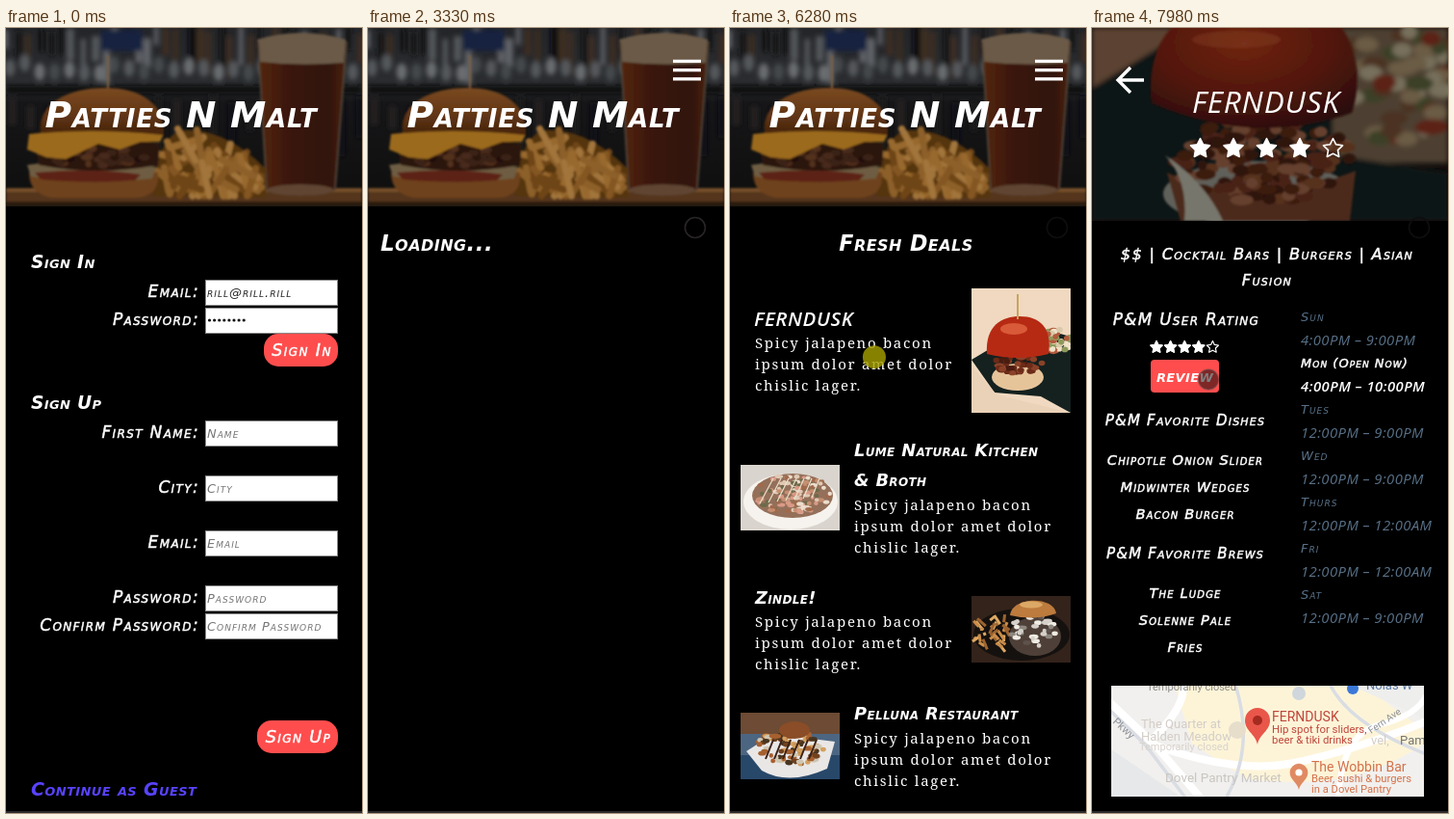
Write an HTML page that moves like this. It is 370 px wide and 814 px high and loops after 8000 ms.

```html
<!DOCTYPE html>
<html lang="en">
<head>
<meta charset="utf-8">
<title>Patties N Malt</title>
<style>
  html, body { margin: 0; width: 100%; height: 100%; overflow: hidden; background: #000; }
  svg { display: block; }
  .hand, .thin, .bold { font-family: "DejaVu Sans", sans-serif; font-style: italic; font-variant: small-caps; letter-spacing: .08em; }
  .hand { stroke-width: .5px; }
  .bold { font-weight: 700; letter-spacing: .02em; }
  .tall { font-family: "Open Sans", sans-serif; font-style: italic; letter-spacing: .03em; }
  .slab { font-family: "Noto Serif", serif; font-size: 15px; letter-spacing: 1.7px; }
  .plain { font-family: Roboto, sans-serif; }
  .status { font-family: "Open Sans", sans-serif; }
</style>
</head>
<body>
<svg id="stage" width="100%" height="100%" viewBox="0 0 370 814"></svg>
<script>
const stage = document.getElementById('stage');
const LOOP = 8000, RED = '#ff4d4d', SLATE = '#587188';

let seed = 11;
const rnd = (a, b) => {
  seed = (seed * 16807) % 2147483647;
  return a + (b - a) * seed / 2147483647;
};
const pick = list => list[Math.floor(rnd(0, list.length))];
const many = (n, make) => Array.from({ length: n }, (_, i) => make(i)).join('');
const esc = s => s.replace(/&/g, '&amp;');

const text = (s, x, y, size, { fill = '#fff', anchor = 'start', cls = 'hand', weight = '', extra = '' } = {}) =>
  `<text class="${cls}" x="${x}" y="${y}" fill="${fill}" ${cls === 'hand' ? `stroke="${fill}"` : ''} text-anchor="${anchor}" style="font-size:${size}px;${weight && 'font-weight:' + weight}" ${extra}>${esc(s)}</text>`;
const mid = (s, x, y, size, o = {}) => text(s, x, y, size, { anchor: 'middle', ...o });
const BOLD = { cls: 'bold' };
const rect = (x, y, w, h, fill, rx = 0, extra = '') =>
  `<rect x="${x}" y="${y}" width="${w}" height="${h}" rx="${rx}" fill="${fill}" ${extra}/>`;
const oval = (cx, cy, rx, ry, fill, extra = '') =>
  `<ellipse cx="${cx}" cy="${cy}" rx="${rx}" ry="${ry}" fill="${fill}" ${extra}/>`;
const path = (d, fill, extra = '') => `<path d="${d}" fill="${fill}" ${extra}/>`;
const line = (d, color, w, extra = '') => path(d, 'none', `stroke="${color}" stroke-width="${w}" ${extra}`);
const group = (id, body) => `<g id="${id}">${body}</g>`;
const frame = (x, y, w, h, body) => `<svg x="${x}" y="${y}" width="${w}" height="${h}" viewBox="0 0 ${w} ${h}">${body}</svg>`;
const blur = (body, k = 'soft') => `<g filter="url(#${k})">${body}</g>`;

function star(cx, cy, r, full) {
  const pts = many(10, i => {
    const a = i * Math.PI / 5 - Math.PI / 2, k = i % 2 ? r * .5 : r;
    return `${(cx + k * Math.cos(a)).toFixed(1)},${(cy + k * Math.sin(a)).toFixed(1)} `;
  });
  return `<polygon points="${pts}" fill="${full ? '#fff' : 'none'}" stroke="#fff" stroke-width="${r > 9 ? 1.6 : 1.2}" stroke-linejoin="round"/>`;
}

const scatter = (n, cx, cy, rx, ry, colors, size) => many(n, () => {
  const a = rnd(0, 6.28), k = Math.sqrt(rnd(0, 1));
  return oval(cx + rx * k * Math.cos(a), cy + ry * k * Math.sin(a), rnd(size * .6, size * 1.5), size * .7, pick(colors));
});

const defs = `<defs>
  <filter id="soft" x="-20%" y="-20%" width="140%" height="140%"><feGaussianBlur stdDeviation="2.4"/></filter>
  <filter id="slight"><feGaussianBlur stdDeviation=".8"/></filter>
  <linearGradient id="bun" x1="0" y1="0" x2="0" y2="1"><stop offset="0" stop-color="#7a4a22"/><stop offset=".55" stop-color="#643715"/><stop offset="1" stop-color="#43220d"/></linearGradient>
  <linearGradient id="beer" x1="0" y1="0" x2="1" y2="0"><stop offset="0" stop-color="#55270d"/><stop offset=".35" stop-color="#3a1607"/><stop offset=".8" stop-color="#30120a"/><stop offset="1" stop-color="#4e2510"/></linearGradient>
  <linearGradient id="bar" x1="0" y1="0" x2="0" y2="1"><stop offset="0" stop-color="#242528"/><stop offset=".3" stop-color="#2a2c2f"/><stop offset=".42" stop-color="#161618"/><stop offset="1" stop-color="#0e0e0e"/></linearGradient>
  <radialGradient id="dome" cx=".45" cy=".3" r=".75"><stop offset="0" stop-color="#6f2410"/><stop offset=".6" stop-color="#50160a"/><stop offset="1" stop-color="#2a0d08"/></radialGradient>
</defs>`;

const banner = frame(0, 0, 370, 185,
  rect(0, 0, 370, 185, 'url(#bar)') +
  blur(many(34, i => rect(i * 11 + rnd(-3, 3), rnd(-6, 12), rnd(4, 8), rnd(18, 46), pick(['#55585c', '#131415', '#3f2e20', '#0e0f10', '#62656a']))) +
    many(24, i => oval(i * 15.5 + 4, rnd(36, 48), 5.5, 9, pick(['#6a6d70', '#44484c', '#55585c']))) +
    rect(98, 2, 44, 22, '#162440') + rect(0, 60, 370, 8, '#09090a') +
    many(20, i => rect(i * 19 + 3, rnd(70, 84), 7, rnd(20, 60), pick(['#1d1d1f', '#101012', '#262422'])))) +
  blur(
    rect(0, 166, 370, 19, '#54351a') + rect(0, 166, 370, 4, '#76502a') + rect(0, 180, 370, 5, '#2c1a0c') +
    path('M262 16 L354 16 L342 168 Q304 178 270 168 Z', 'url(#beer)') +
    path('M261 12 Q306 -2 353 12 L351 36 Q306 40 263 35 Z', '#6b5a47') +
    line('M262 14 L271 168 M354 14 L342 168', '#4e4034', 2) +
    oval(306, 168, 35, 6, '#5e4433') +
    path('M152 174 Q158 108 186 106 Q228 104 270 146 L270 176 Z', '#55340f') +
    many(58, () => {
      const x = rnd(164, 256), top = 116 + Math.abs(x - 192) * .5;
      const y = rnd(top, 168), a = rnd(.2, 1.5) * pick([1, 1, -1]), l = rnd(11, 20);
      const dx = l * Math.cos(a), dy = l * Math.sin(a);
      return line(`M${x - dx} ${Math.min(174, y - dy)} L${x + dx} ${Math.min(174, y + dy)}`, pick(['#8d6029', '#a1743a', '#845622', '#98692e', '#6e4519']), 7, 'stroke-linecap="round"');
    }) +
    line('M106 28 V68', '#7c603f', 2) +
    path('M24 150 Q92 140 158 150 Q160 174 136 176 L48 176 Q24 172 24 150 Z', '#6e421c') +
    path('M22 142 Q90 132 156 144 L152 156 Q90 164 26 154 Z', '#6e5d42') +
    path('M30 150 Q90 144 140 152 L134 158 Q90 162 36 157 Z', '#5d2114') +
    path('M30 118 Q90 108 160 120 L158 142 Q94 154 34 142 Z', '#2c180d') +
    scatter(34, 94, 134, 54, 10, ['#47291a', '#3a2013', '#53301d', '#211109'], 5) +
    path('M24 110 Q96 102 164 110 L160 118 L140 118 L118 126 L96 120 L62 136 L42 134 L22 126 Z', '#9c6a1c') +
    path('M36 109 C32 78 66 62 102 62 C142 62 166 80 164 111 Q98 104 36 109 Z', 'url(#bun)'), 'slight'));

const menu = many(3, i => rect(317, 32.8 + i * 9.2, 29, 3.3, '#fff'));

const input = (y, s, fill = '#757575') =>
  rect(207.5, y + .5, 137, 26, '#fff', 0, 'stroke="#8a8a8a"') + text(s, 209, y + 18, 12.9, { fill, cls: 'thin' });
const field = (label, y, s, fill) => text(label, 201, y + 18, 17, { anchor: 'end' }) + input(y, s, fill);
const button = (s, x, y, w) => rect(x, y, w, 34, RED, 15) + mid(s, x + w / 2 + 1, y + 23, 17.6);

const form =
  text('Sign In', 26, 249, 18.6, BOLD) +
  field('Email:', 261, 'rill@rill.rill', '#222') +
  field('Password:', 290, '') + many(8, i => oval(211.5 + i * 5.1, 303, 1.6, 1.6, '#111')) +
  button('Sign In', 268, 317, 77) +
  text('Sign Up', 26, 395, 18.6, BOLD) +
  field('First Name:', 407, 'Name') + field('City:', 464, 'City') + field('Email:', 521, 'Email') +
  field('Password:', 578, 'Password') + field('Confirm Password:', 607, 'Confirm Password') +
  button('Sign Up', 261, 718, 84) +
  text('Continue as Guest', 26, 796, 19, { fill: '#5843ff', cls: 'bold' });

const empty = ['No restaurants found.', 'Please enter a city name', 'or use your default', 'location.']
  .map((s, i) => text(s, 13, 231 + i * 45, 26.5, BOLD)).join('');

const blurb = (x, y) => ['Spicy jalapeno bacon', 'ipsum dolor amet dolor', 'chislic lager.']
  .map((s, i) => text(s, x, y + i * 22, 15, { cls: 'slab' })).join('');
const name = (s, x, y) => text(s, x, y, 17.8, BOLD);

const photos = [
  frame(251, 270, 103, 129,
    rect(0, 0, 103, 129, '#f0d9c0') + path('M0 74 L60 38 L103 50 V129 L72 112 L24 108 Z', '#14211f') +
    path('M0 80 L26 110 L103 129 H0 Z', '#ead2b8') +
    scatter(40, 88, 54, 16, 12, ['#d8c9a8', '#b25b3c', '#8f9a5c', '#efe2c8'], 4) +
    oval(48, 92, 27, 14, '#e6c49a') + scatter(40, 48, 78, 26, 12, ['#6b2b18', '#8a4128', '#4b1c10'], 4) +
    path('M16 68 C14 38 32 29 50 29 C72 29 84 42 80 68 Q48 76 16 68 Z', '#b62a14') +
    oval(44, 42, 14, 6, '#d95a38') + line('M48 6 V32', '#c8a35f', 2)),
  frame(11, 453, 103, 68,
    rect(0, 0, 103, 68, '#d9d4cd') + oval(52, 38, 49, 29, '#f6f3ee') + oval(54, 32, 42, 23, '#94705a') +
    scatter(110, 54, 30, 39, 21, ['#c58f72', '#a06a4c', '#e0c9b4', '#6d6a4a', '#d99a86', '#ecdccb'], 3) +
    many(7, i => line(`M${20 + i * 9} ${40 - i} L${34 + i * 8} 14`, '#eadfcb', 1.2))),
  frame(251, 589, 103, 69,
    rect(0, 0, 103, 69, '#33231b') + oval(52, 40, 50, 27, '#15110f') +
    many(32, () => { const x = rnd(4, 36), y = rnd(24, 54); return line(`M${x} ${y} l${rnd(-9, 9)} ${rnd(-11, 11)}`, pick(['#c98c4a', '#dca963', '#9c6430']), 3); }) +
    oval(66, 42, 27, 20, '#4e4038') + scatter(34, 64, 36, 24, 18, ['#d5d0c9', '#8d8780', '#5d524c', '#f0ece4'], 3.4) +
    path('M40 20 C42 0 86 0 88 18 Q66 26 40 20 Z', '#bd7b3d') + oval(62, 9, 12, 3.5, '#dca866')),
  frame(11, 710, 103, 69,
    rect(0, 0, 103, 69, '#4c6682') + rect(0, 0, 103, 22, '#6d4b34') + rect(0, 44, 103, 25, '#28486a') +
    path('M6 40 L34 22 L98 30 L90 58 Q50 76 22 60 Z', '#e9e7e6') +
    scatter(90, 52, 36, 36, 18, ['#a6602f', '#70421f', '#d3a05e', '#48351f', '#cfc6b4'], 3.4) +
    oval(56, 18, 16, 9, '#8a4d28') + many(6, i => line(`M${26 + i * 9} 48 l8 -20`, '#3b2116', 2)))
];

const deals = mid('Fresh Deals', 183, 231, 22.2, BOLD) +
  group('first', text('FERNDUSK', 25, 293, 20.5, { cls: 'tall', weight: 600 }) + blurb(26, 316)) +
  group('rest',
    name('Lume Natural Kitchen', 129, 412) + name('& Broth', 129, 443) + blurb(129, 468) +
    name('Zindle!', 26, 565) + blurb(26, 589) +
    name('Pelluna Restaurant', 129, 685) + blurb(129, 710) +
    name('Wick & Tuber –', 23, 806)) +
  photos.map((p, i) => group('photo' + i, p)).join('');

const hero = frame(0, 0, 370, 200,
  rect(0, 0, 370, 200, '#120e0d') +
  blur(rect(0, 0, 130, 70, '#5c4332') + path('M0 62 L70 20 L110 0 H260 L250 200 H0 Z', '#0f1615') +
    rect(250, 0, 120, 140, '#4d3f30') +
    scatter(46, 318, 58, 60, 62, ['#6a5b45', '#5b2418', '#77705c', '#3a4127', '#4b3121'], 11) +
    path('M240 130 L370 150 V200 H220 Z', '#0d1312')) +
  blur(oval(172, 172, 98, 34, '#61605a') + path('M78 150 Q170 190 274 148 L268 200 H92 Z', '#4c2a1a') +
    scatter(150, 178, 136, 92, 44, ['#4a2218', '#56301f', '#2f120c', '#65402f', '#3b1a11'], 8) +
    path('M76 132 Q100 158 96 200 H136 Q118 160 76 132 Z', '#77766c') +
    path('M62 78 C56 30 76 -12 120 -22 H232 C272 -8 284 50 270 88 Q170 124 62 78 Z', 'url(#dome)') +
    oval(150, 12, 46, 9, '#84432a', 'opacity=".4"'), 'slight'));

const times = ['4:00PM – 9:00PM', '4:00PM – 10:00PM', '12:00PM – 9:00PM', '12:00PM – 9:00PM', '12:00PM – 12:00AM', '12:00PM – 12:00AM', '12:00PM – 9:00PM'];
const hours = ['Sun', 'Mon (Open Now)', 'Tues', 'Wed', 'Thurs', 'Fri', 'Sat'].map((d, i) => {
  const open = i === 1, fill = open ? '#fff' : SLATE;
  return text(d, 217, 304 + i * 48, 13, { fill, cls: open ? 'hand' : 'thin' }) +
    text(times[i], 217, 329 + i * 48, 14.8, { fill, cls: 'tall', weight: open ? 600 : 400 });
}).join('');
const dishes = (list, y) => list.map((s, i) => mid(s, 97, y + i * 28, 14.6)).join('');

const detail = hero +
  line('M54 54 H28 M40 41 L27 54 L40 67', '#fff', 3.4) +
  mid('FERNDUSK', 181, 88, 31.5, { cls: 'tall', weight: 500 }) +
  many(5, i => star(112.5 + i * 34.5, 125, 10.5, i < 4)) +
  mid('$$ | Cocktail Bars | Burgers | Asian', 182, 240, 16.2) + mid('Fusion', 182, 267, 16.2) +
  mid('P&M User Rating', 98, 308, 16.8) +
  many(5, i => star(67 + i * 14.6, 331, 6.4, false)) +
  group('rated', many(4, i => star(67 + i * 14.6, 331, 6.4, true))) +
  rect(61, 344, 71, 34, RED, 4) + mid('review', 96.5, 367, 18, BOLD) +
  mid('P&M Favorite Dishes', 97, 412, 15) +
  group('brews', mid('P&M Favorite Brews', 97, 550, 15)) +
  group('lists',
    dishes(['Chipotle Onion Slider', 'Midwinter Wedges', 'Bacon Burger'], 453) +
    dishes(['The Ludge', 'Solenne Pale', 'Fries'], 591)) +
  hours;

const label = (s, x, y, size, fill, extra = '') => text(s, x, y, size, { cls: 'plain', fill, extra });
const pin = (x, y, k, fill, dot) => `<g transform="translate(${x} ${y}) scale(${k})">` +
  path('M0 0 C-2 -11 -13 -14 -13 -25 A13 13 0 0 1 13 -25 C13 -14 2 -11 0 0 Z', fill) + oval(0, -25, 5, 5, dot) + '</g>';
const map = group('map', frame(20, 682, 325, 115,
  rect(0, 0, 325, 115, '#f1f0ee') +
  path('M66 0 H262 L325 46 V60 Q250 112 140 96 L84 60 Z', '#fdf4d8') +
  path('M0 66 L72 115 H0 Z', '#e7e8ea') + path('M250 0 H325 V34 Z', '#eeeeec') +
  line('M-5 14 L46 62 L96 120 M40 58 Q80 20 74 -4 M46 62 Q130 92 190 80 T330 36', '#fff', 8) +
  line('M-5 22 L36 62 L80 120 M226 -4 Q246 40 330 72 M120 115 Q150 62 128 -4', '#d9dde3', 3.5) +
  line('M236 120 Q238 50 280 40 T330 4', '#fff', 6) +
  label('Temporarily closed', 37, 5, 11, '#8d8a86') +
  label('Nolas W', 265, 4, 13, '#5d7ba6') + oval(251, 3, 6, 6, '#3c78d8') + oval(195, 8, 7, 7, '#cfd6dc') +
  label('The Quarter at', 31, 44, 13, '#d3cdc7') + label('Halden Meadow', 31, 57, 13, '#d3cdc7') +
  label('Temporarily closed', 29, 67, 11, '#d8d2cc') + oval(131, 46, 9, 9, '#e6ddcb') +
  label('Dovel Pantry Market', 56, 100, 13.5, '#c9c5c0') +
  label('Pkwy', 1, 38, 11, '#8b8f95', 'transform="rotate(43 1 38)"') +
  label('Fern Ave', 270, 50, 10, '#8b8f95', 'transform="rotate(-34 270 50)"') +
  label('vel,', 270, 61, 13, '#d3cdc7') + label('Pam', 300, 61, 13, '#75736f') +
  pin(152, 61, 1, '#e9564a', '#a52a20') +
  label('FERNDUSK', 167, 37, 14, '#c0453a') +
  label('Hip spot for sliders,', 167, 49, 11.4, '#c0453a') + label('beer & tiki drinks', 167, 60, 11.4, '#c0453a') +
  pin(195, 108, .72, '#e08a63', '#fff') +
  label('The Wobbin Bar', 208, 89, 14, '#d4714a') +
  label('Beer, sushi & burgers', 208, 100, 11.2, '#d4714a') + label('in a Dovel Pantry', 208, 111, 11.2, '#d4714a')));

const status = group('status', path('M0 791 H114 Q118 791 118 795 V812 H0 Z', '#36373a') +
  text('Waiting for pnm.rill...', 0, 806, 11.6, { cls: 'status', fill: '#c4c6c9' }));

stage.innerHTML = defs + rect(0, 0, 370, 814, '#000') +
  group('top', banner + mid('Patties N Malt', 182, 103, 37.5, BOLD)) + group('menu', menu) +
  group('form', form) + group('empty', empty) +
  group('loading', text('Loading...', 13, 231, 23, BOLD)) +
  group('deals', deals) + group('detail', detail) + map + status +
  rect(0, 812, 370, 2, '#2b2b2c') +
  '<circle id="rest-touch" cx="340" cy="207" r="10.5" fill="none" stroke="#0f0e0e" stroke-width="1.6"/>' +
  '<circle id="touch"/>' +
  group('arrow', path('M0 0 V17 L4 13.2 L6.8 19.4 L9.6 18.2 L6.9 12.2 H12 Z', '#fff', 'stroke="#000" transform="translate(145 352)"'));

const $ = id => document.getElementById(id);
const show = (id, on) => $(id).setAttribute('display', on ? 'inline' : 'none');
const drop = (id, dy) => $(id).setAttribute('transform', `translate(0 ${dy})`);

// Pointer stops: time, x, y
const track = [
  [70, 333, 738], [610, 305, 328], [1540, 305, 328], [2080, 300, 231], [2230, 300, 231], [2310, 300, 221],
  [3010, 300, 221], [3330, 340, 207], [4400, 340, 207], [4800, 326, 174], [5350, 326, 174], [5500, 289, 237],
  [5650, 289, 237], [5890, 175, 377], [6050, 175, 377], [6200, 150, 341], [7440, 145, 352], [7700, 121, 364.5]
];
function pointer(t) {
  const i = track.findIndex(p => p[0] > t);
  if (i < 0) return track[track.length - 1].slice(1);
  if (i === 0) return track[0].slice(1);
  const [t0, x0, y0] = track[i - 1], [t1, x1, y1] = track[i];
  const k = (t - t0) / (t1 - t0), e = k * k * (3 - 2 * k);
  return [x0 + (x1 - x0) * e, y0 + (y1 - y0) * e];
}

function render(t) {
  const within = (a, b) => t >= a && t < b;
  show('top', t < 6360);
  show('menu', within(1160, 6360));
  show('form', t < 1160);
  show('empty', within(1160, 1540));
  show('loading', within(1540, 4340));
  show('deals', within(4340, 6360));
  show('detail', t >= 6360);

  const grown = t >= 4400;
  drop('first', grown ? 16 : 0);
  drop('rest', grown ? 32 : 0);
  photos.forEach((_, i) => show('photo' + i, t >= 4400 + i * 100));

  const rated = t >= 6660;
  show('rated', rated);
  show('lists', rated);
  drop('brews', rated ? 0 : -84);
  show('status', within(6830, 7600));
  show('map', t >= 7600);

  const [x, y] = pointer(t), touch = $('touch');
  const pressed = within(840, 990) || within(6250, 6360);
  const look = {
    cx: x, cy: y, r: pressed ? 12 : 10.5,
    fill: pressed ? 'rgba(165,158,0,.82)' : 'rgba(0,0,0,.5)',
    stroke: pressed ? 'none' : 'rgba(90,82,82,.45)', 'stroke-width': 1.6
  };
  for (const k in look) touch.setAttribute(k, look[k]);
  show('touch', within(70, 6360) || t >= 7440);
  show('rest-touch', t >= 4800);
  show('arrow', within(7290, 7440));
}

const start = performance.now();
function tick() {
  render((performance.now() - start) % LOOP);
  requestAnimationFrame(tick);
}
tick();
</script>
</body>
</html>
```
